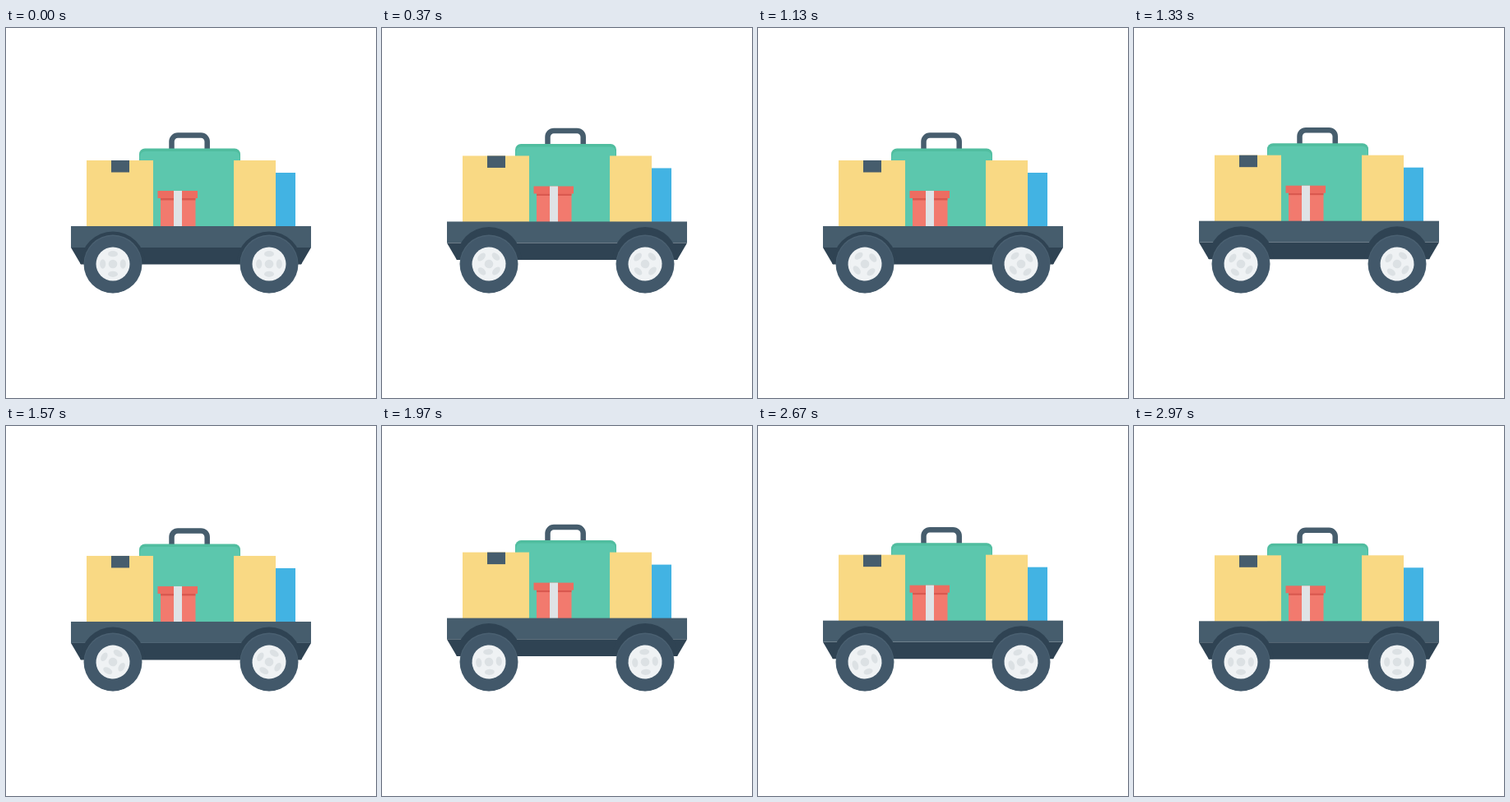
Recreate the animation shown at these times as an HTML page with a canvas. Size 450 px wide and 450 px high, loop 3000 ms.

```html
<!DOCTYPE html>
<html lang="en">
<head>
<meta charset="utf-8">
<title>Luggage cart</title>
<style>
html, body { margin: 0; width: 100%; height: 100%; overflow: hidden; background: #fff; }
canvas { display: block; width: 450px; height: 450px; }
</style>
</head>
<body>
<canvas id="stage" width="450" height="450"></canvas>
<script>
const ctx = document.getElementById('stage').getContext('2d');
const LOOP = 3000, FRAMES = 90;
const BOUNCE = 17, RISE = 8, LIFT = 7.4;
const SPIN = 1080 / 89;
const WHEELS = [130, 320], AXLE = 287;
const C = {
  slate: '#465d6d', dark: '#2f4353', tyre: '#42586a', rim: '#4a6071',
  hub: '#eff2f4', hole: '#dce1e4', yellow: '#f9d984', green: '#5cc7ad',
  greenTop: '#50bd9f', blue: '#42b3e3', red: '#f27a6e', redLid: '#ec6d61',
  redShade: '#d9584f', ribbon: '#dfe3e6'
};

function rect(color, x, y, w, h) {
  ctx.fillStyle = color;
  ctx.fillRect(x, y, w, h);
}

function oval(color, x, y, rx, ry = rx) {
  ctx.fillStyle = color;
  ctx.beginPath();
  ctx.ellipse(x, y, rx, ry, 0, 0, Math.PI * 2);
  ctx.fill();
}

function roundTop(x, y, w, h, r) {
  ctx.beginPath();
  ctx.roundRect(x, y, w, h, [r, r, 0, 0]);
}

function suitcase() {
  ctx.strokeStyle = C.slate;
  ctx.lineWidth = 6.5;
  ctx.beginPath();
  ctx.moveTo(201.5, 149);
  ctx.lineTo(201.5, 138);
  ctx.arcTo(201.5, 130.5, 209, 130.5, 7.5);
  ctx.lineTo(237, 130.5);
  ctx.arcTo(244.7, 130.5, 244.7, 138, 7.5);
  ctx.lineTo(244.7, 149);
  ctx.stroke();

  ctx.save();
  roundTop(162, 146.5, 123, 95, 7);
  ctx.clip();
  rect(C.greenTop, 162, 146, 123, 96);
  ctx.fillStyle = C.green;
  roundTop(163, 150, 121, 92, 6);
  ctx.fill();
  ctx.restore();
}

function gift() {
  rect(C.red, 188, 206, 42.5, 35.5);
  rect(C.redShade, 188, 207, 42.5, 2.5);
  rect(C.redLid, 184.5, 198, 48.5, 9);
  rect(C.ribbon, 204, 198, 10, 43.5);
}

function deck() {
  rect(C.slate, 79, 241, 292, 26);
  ctx.fillStyle = C.dark;
  ctx.beginPath();
  ctx.moveTo(79, 267);
  ctx.lineTo(371, 267);
  ctx.lineTo(359, 287.5);
  ctx.lineTo(91, 287.5);
  ctx.fill();
  for (const x of WHEELS) {
    ctx.beginPath();
    ctx.arc(x, AXLE, 39.5, Math.PI, 0);
    ctx.fill();
  }
}

function cart(y) {
  ctx.save();
  ctx.translate(0, y);
  suitcase();
  rect(C.yellow, 98, 161, 81, 80.5);
  rect(C.slate, 128, 161, 22, 14.5);
  rect(C.blue, 328, 176, 24, 65.5);
  rect(C.yellow, 277, 161, 51, 80.5);
  gift();
  deck();
  ctx.restore();
}

function wheel(x, angle) {
  oval(C.rim, x, AXLE, 35.5);
  oval(C.tyre, x, AXLE + 0.6, 34.6);
  ctx.save();
  ctx.translate(x, AXLE);
  ctx.rotate(angle);
  oval(C.hub, 0, 0, 20.5);
  oval(C.hole, 0, 0, 5.3);
  for (let i = 0; i < 4; i++) {
    const flat = i % 2 === 0;
    oval(C.hole, 0, -12.3, flat ? 6 : 5.7, 3.6);
    ctx.rotate(Math.PI / 2);
  }
  ctx.restore();
}

function lift(frame) {
  const p = frame % BOUNCE;
  const k = p < RISE ? p / RISE : (BOUNCE - p) / (BOUNCE - RISE);
  return -LIFT * (1 - Math.cos(Math.PI * k)) / 2;
}

function draw(now) {
  // 30 steps per second, aligned to whole hundredths
  const frame = Math.floor((now % LOOP) * FRAMES / LOOP + 0.15) % FRAMES;
  rect('#fff', 0, 0, 450, 450);
  cart(lift(frame));
  const angle = frame * SPIN * Math.PI / 180;
  for (const x of WHEELS) wheel(x, angle);
}

const start = performance.now();
function tick() {
  draw(performance.now() - start);
  requestAnimationFrame(tick);
}
tick();
</script>
</body>
</html>
```
